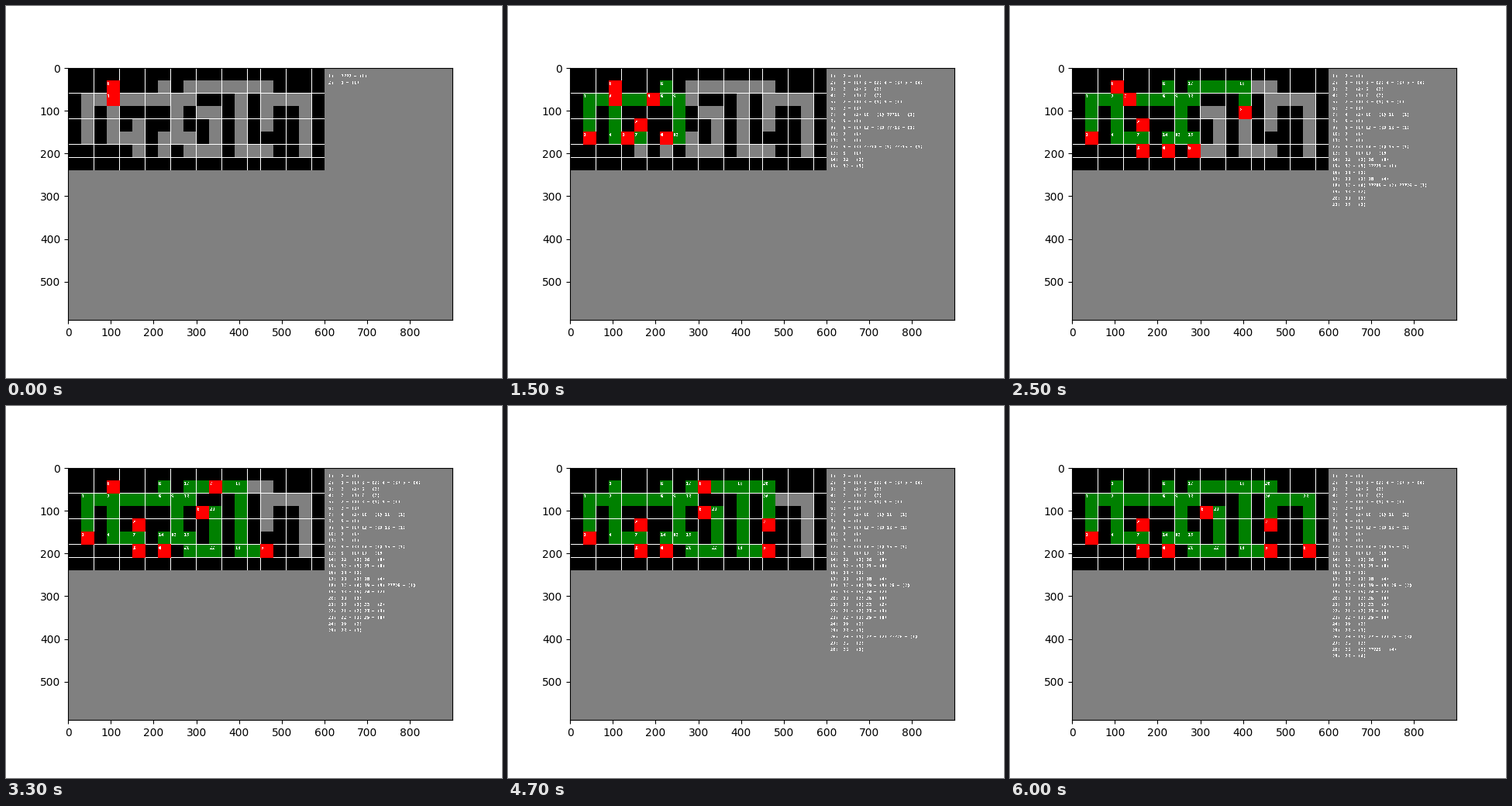
Write a matplotlib script that moves like this. It is 640 px wide and 480 px high and loops after 6.1 s.

```python
from functools import lru_cache

import numpy as np
import matplotlib.pyplot as plt
from matplotlib.animation import FuncAnimation
from matplotlib.path import Path
from matplotlib.textpath import TextPath

FRAMES = 61
CELL = 30
COLS, ROWS = 20, 8
AGENTS = 8
WHITE, GRAY, BLACK = (255,) * 3, (128,) * 3, (0, 0, 0)
GREEN, RED = (0, 128, 0), (255, 0, 0)
CHAR_W, CHAR_H, BASELINE = 6, 12, 9

START = (3, 1)
NORTH, WEST, SOUTH, EAST = DIRECTIONS = [(0, -1), (-1, 0), (0, 1), (1, 0)]

# Corridors as polylines through their corners
CORRIDORS = [
    [START, (3, 5), (5, 5)],
    [(5, 4), (5, 6)],
    [(1, 5), (1, 2), (9, 2), (9, 1), (15, 1), (15, 4)],
    [(7, 1), (7, 2)],
    [(8, 2), (8, 5)],
    [(7, 6), (7, 5), (9, 5), (9, 6), (11, 6), (11, 3), (10, 3)],
    [(13, 1), (13, 6), (15, 6)],
    [(15, 2), (18, 2), (18, 6)],
]


def shift(cell, step):
    return cell[0] + step[0], cell[1] + step[1]


def carve(lines):
    """All cells that the corridors cover."""
    cells = set()
    for line in lines:
        for (ax, ay), (bx, by) in zip(line, line[1:]):
            cells |= {(x, y)
                      for x in range(min(ax, bx), max(ax, bx) + 1)
                      for y in range(min(ay, by), max(ay, by) + 1)}
    return cells


OPEN = carve(CORRIDORS)


def exits(cell):
    return [d for d in DIRECTIONS if shift(cell, d) in OPEN]


def is_passage(cell):
    return exits(cell) in ([NORTH, SOUTH], [WEST, EAST])


def route(start, goal):
    """Cells from start to goal, without start."""
    paths = {start: []}
    queue = [start]
    for cell in queue:
        for step in exits(cell):
            spot = shift(cell, step)
            if spot not in paths:
                paths[spot] = paths[cell] + [spot]
                queue.append(spot)
    return paths[goal]


class Node:
    def __init__(self, number, parent, edge, born):
        self.number, self.parent, self.edge = number, parent, edge
        self.cell, self.born = edge[-1], born
        self.explored = FRAMES

    def length(self, k):
        return max(1, sum(visited.get(c, FRAMES) <= k for c in self.edge))


class Agent:
    def __init__(self):
        self.cell, self.goal, self.path = START, None, []

    def act(self, k):
        if self.goal and not self.path:
            explore(self.goal, k)
            self.goal = None
        if not self.goal and pending:
            self.goal = pending.pop(0)
            self.path = route(self.cell, self.goal.cell)
        if self.path:
            self.cell = self.path.pop(0)
            visited.setdefault(self.cell, k)


def explore(node, k):
    """Follow each new exit of a node to the next node."""
    node.explored = k
    for step in exits(node.cell):
        edge = [shift(node.cell, step)]
        if edge[0] in visited:
            continue
        while is_passage(edge[-1]):
            edge.append(shift(edge[-1], step))
        child = Node(len(nodes) + 1, node, edge, k)
        nodes.append(child)
        pending.append(child)


def simulate():
    agents = [Agent() for _ in range(AGENTS)]
    explore(nodes[0], 0)
    history = []
    for k in range(FRAMES):
        for agent in agents:
            agent.act(k)
        history.append([agent.cell for agent in agents])
    return history


visited = {START: -1}
nodes = [Node(1, None, [START], 0)]
pending = []
history = simulate()


@lru_cache(maxsize=None)
def glyph(ch):
    """Hard-edged bitmap of one character, from its outline."""
    mask = np.zeros((CHAR_H, CHAR_W), bool)
    if ch == "-":
        mask[5, :5] = True
    elif ch != " ":
        sub = 4
        xs = (np.arange(CHAR_W * sub) + 0.5) / sub
        ys = BASELINE - (np.arange(CHAR_H * sub) + 0.5) / sub
        points = np.stack(np.meshgrid(xs, ys), -1).reshape(-1, 2) * 10
        inside = np.zeros(len(points), bool)
        outline = TextPath((0, 0), ch, size=96,
                           prop={"family": "DejaVu Sans Mono",
                                 "weight": "bold"})
        for poly in outline.to_polygons():
            inside ^= Path(poly).contains_points(points)
        cover = inside.reshape(CHAR_H, sub, CHAR_W, sub).mean((1, 3))
        mask = cover > 0.48
        mask[:2] = mask[10:] = False
    return mask


def write(img, x, y, text):
    for i, ch in enumerate(text):
        left = x + i * CHAR_W
        img[y:y + CHAR_H, left:left + CHAR_W][glyph(ch)] = WHITE


def fill_cell(img, cell, color, outline):
    x, y = cell[0] * CELL, cell[1] * CELL
    img[y:y + CELL + 1, x:x + CELL + 1] = outline
    img[y + 1:y + CELL, x + 1:x + CELL] = color


def label_cell(img, cell, number):
    write(img, cell[0] * CELL + 2, cell[1] * CELL + 2, str(number))


def node_text(node, k):
    parts = []
    if node.parent:
        parts.append(f"{node.parent.number} - ({node.length(k)})")
    for child in nodes:
        if child.parent is node and child.born <= k:
            mark = "" if child.explored <= k else "???"
            parts.append(f"{mark}{child.number} - ({child.length(k)})")
    return f"{node.number}:".ljust(5) + " ".join(parts)


def render(k):
    img = np.full((590, 900, 3), GRAY, np.uint8)
    for cell in np.ndindex(COLS, ROWS):
        color = BLACK
        if cell in OPEN:
            color = GREEN if visited.get(cell, FRAMES) <= k else GRAY
        fill_cell(img, cell, color, WHITE)
    for node in nodes:
        if visited.get(node.cell, FRAMES) <= k:
            label_cell(img, node.cell, node.number)
        if node.born <= k:
            write(img, 610, 15 * node.number, node_text(node, k))
    for number, cell in enumerate(history[k], 1):
        fill_cell(img, cell, RED, RED)
        label_cell(img, cell, number)
    return img


fig, ax = plt.subplots(figsize=(6.4, 4.8), dpi=100)
picture = ax.imshow(render(0), interpolation="nearest")


def update(k):
    picture.set_data(render(k))
    return [picture]


anim = FuncAnimation(fig, update, frames=FRAMES, interval=100,
                     repeat=True, repeat_delay=0)
plt.show()
```
